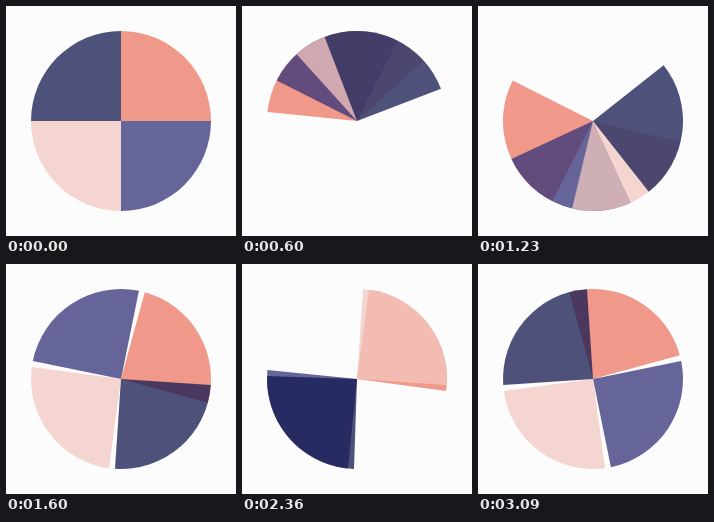
Recreate the animation shown at these times as an HTML page. Size 230 by 230 pixels, loop 3130 ms.

```html
<!DOCTYPE html>
<html lang="en">
<head>
<meta charset="utf-8">
<title>Turning quarters</title>
<style>
  html, body { margin: 0; width: 100%; height: 100%; overflow: hidden; background: #fcfcfc; }
  svg { display: block; width: 100%; height: 100%; }
  path { fill-opacity: .75; }
</style>
</head>
<body>
<svg viewBox="0 0 230 230"></svg>
<script>
const LOOP = 3130;
const STEPS = 94;
const CENTER = 115;
const RADIUS = 90;

// Bottom to top; turns = full revolutions per loop.
const quarters = [
  { color: 'rgb(236,121,100)', start: 0, turns: 4 },
  { color: 'rgb(51,51,121)', start: 90, turns: 3 },
  { color: 'rgb(243,201,193)', start: 180, turns: 2 },
  { color: 'rgb(21,24,79)', start: 270, turns: 1 }
];

const svg = document.querySelector('svg');
for (const quarter of quarters) {
  const path = document.createElementNS('http://www.w3.org/2000/svg', 'path');
  path.setAttribute('d', `M0 0V${-RADIUS}A${RADIUS} ${RADIUS} 0 0 1 ${RADIUS} 0Z`);
  path.setAttribute('fill', quarter.color);
  quarter.path = svg.appendChild(path);
}

function draw(time) {
  // The motion advances in even steps, thirty a second.
  const step = Math.floor((time % LOOP) / LOOP * STEPS + 0.25) % STEPS;
  for (const { path, start, turns } of quarters) {
    const angle = (start + 360 * turns * step / STEPS) % 360;
    path.setAttribute('transform', `translate(${CENTER} ${CENTER}) rotate(${angle})`);
  }
}

function tick() {
  draw(performance.now());
  requestAnimationFrame(tick);
}
tick();
</script>
</body>
</html>
```
